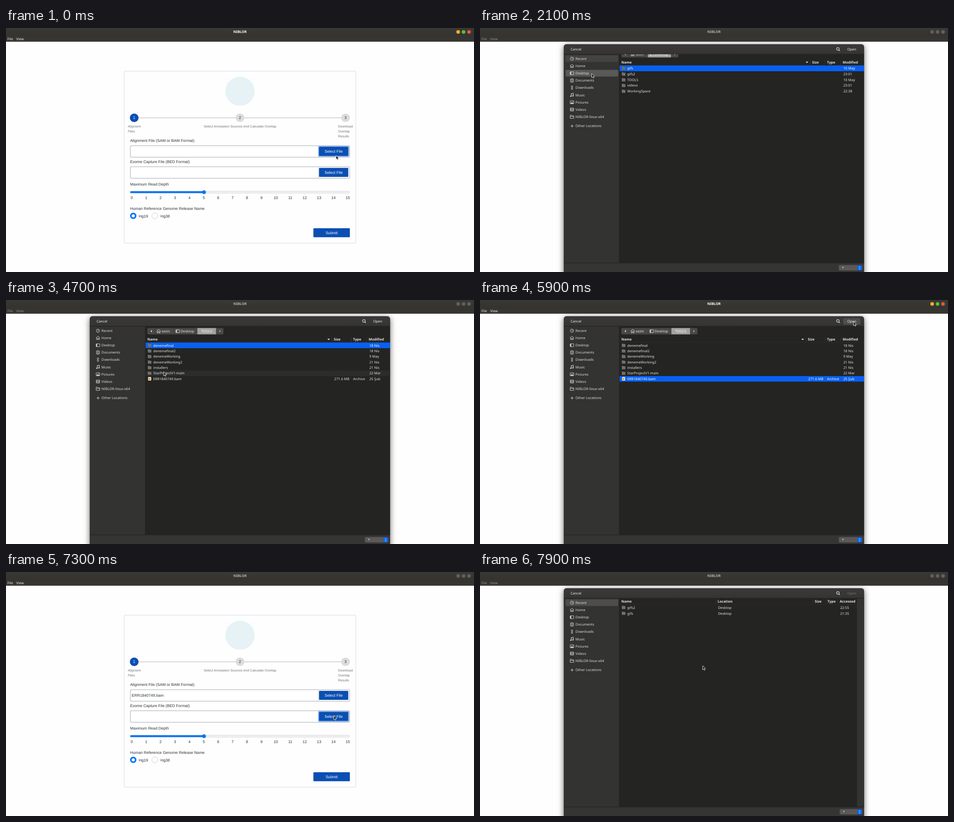
Animation of 1033x542 px, one loop 8 s. Source, as an HTML page with a canvas:

```html
<!DOCTYPE html>
<html lang="en">
<head>
<meta charset="utf-8">
<title>NIBLOR</title>
<style>
html, body { margin: 0; width: 100%; height: 100%; overflow: hidden; background: #fefefe; }
canvas { display: block; width: 1033px; height: 542px; }
</style>
</head>
<body>
<canvas id="stage" width="1033" height="542"></canvas>
<script>
const g = document.getElementById('stage').getContext('2d');
const LOOP = 8000, STEP = 100;
const UI = '"Noto Sans", "Open Sans", sans-serif';
const WEB = '"Liberation Sans", Arial, sans-serif';
const BLUE = '#0b4fb3', ACCENT = '#0a74f5', SELECT = '#0860f2', INK = '#e4e4e2';
const APP = 'NIBLOR', USER = 'sezin';

// Pointer path: time, x, y
const PATH = [
  [0, 728, 283], [100, 735, 281], [200, 738, 277], [300, 731, 276], [600, 731, 276],
  [1300, 330, 150], [1800, 246, 101], [2200, 246, 101], [2500, 348, 134], [3000, 348, 134],
  [3100, 352, 139], [3200, 352, 139], [3400, 349, 146], [3600, 347, 148], [3700, 345, 147],
  [3800, 345, 147], [4100, 340, 124], [4400, 340, 124], [4800, 350, 171], [5100, 350, 171],
  [5600, 824, 48], [6000, 824, 48], [6500, 724, 331], [6900, 723, 319], [7450, 723, 319],
  [7900, 491, 208]
];

const PLACES = ['Recent', 'Home', 'Desktop', 'Documents', 'Downloads', 'Music', 'Pictures',
  'Videos', APP + '-linux-x64'];
const DESKTOP = [['gifs', '10 May'], ['gifs2', '23:01'], ['TOOLS', '10 May'],
  ['videos', '23:01'], ['WorkingSpace', '22:38']];
const TOOLS = [['denemefinal', '18 Nis'], ['denemefinal2', '18 Nis'], ['denemeWorking', '9 May'],
  ['denemeWorking2', '21 Nis'], ['installers', '21 Nis'], ['StarProjectV1-main', '22 Mar'],
  ['ERR1840749.bam', '25 Şub', '271.6 MB']];

const clamp = v => Math.max(0, Math.min(1, v));

function text(s, x, y, color, size, font, align = 'left', weight = '') {
  g.font = `${weight} ${size}px ${font}`;
  g.textAlign = align;
  g.fillStyle = color;
  g.fillText(s, x, y + size * 0.36);
}
const ui = (s, x, y, color = INK, align, weight) => text(s, x, y, color, 7.65, UI, align, weight);
const bold = (s, x, y, color = INK, align) => ui(s, x, y, color, align, 'bold');
const web = (s, x, y, color = '#2b3035', align) => text(s, x, y, color, 8.6, WEB, align);

function box(x, y, w, h, fill, r = 0, stroke, lw = 1) {
  g.beginPath();
  g.roundRect(x, y, w, h, r);
  if (fill) { g.fillStyle = fill; g.fill(); }
  if (stroke) { g.strokeStyle = stroke; g.lineWidth = lw; g.stroke(); }
}

function disc(x, y, r, fill, stroke, lw = 1) {
  g.beginPath();
  g.arc(x, y, r, 0, 7);
  if (fill) { g.fillStyle = fill; g.fill(); }
  if (stroke) { g.strokeStyle = stroke; g.lineWidth = lw; g.stroke(); }
}

function line(color, lw, ...p) {
  g.beginPath();
  for (let i = 0; i < p.length; i += 2) g.lineTo(p[i], p[i + 1]);
  g.strokeStyle = color;
  g.lineWidth = lw;
  g.stroke();
}

function poly(fill, ...p) {
  g.beginPath();
  for (let i = 0; i < p.length; i += 2) g.lineTo(p[i], p[i + 1]);
  g.closePath();
  g.fillStyle = fill;
  g.fill();
}

function pointerAt(t) {
  let i = 0;
  while (i < PATH.length - 1 && PATH[i + 1][0] <= t) i++;
  const a = PATH[i], b = PATH[i + 1] || a;
  const k = b === a ? 0 : (t - a[0]) / (b[0] - a[0]);
  return { x: a[1] + (b[1] - a[1]) * k, y: a[2] + (b[2] - a[2]) * k };
}

function drawPointer({ x, y }) {
  g.save();
  g.translate(x, y);
  g.beginPath();
  [[0.5, 0], [0.5, 9], [2.6, 7.3], [4, 10.3], [5.6, 9.6], [4.2, 6.7], [7, 6.5]]
    .forEach(p => g.lineTo(...p));
  g.closePath();
  g.fillStyle = '#1d1d1d';
  g.fill();
  g.strokeStyle = '#e8e8e8';
  g.lineWidth = 0.9;
  g.stroke();
  g.restore();
}

function drawBar(active, menuOn) {
  const grad = g.createLinearGradient(0, 0, 0, 30);
  grad.addColorStop(0, '#3a3936');
  grad.addColorStop(0.5, '#353431');
  grad.addColorStop(1, '#373633');
  g.fillStyle = grad;
  g.fillRect(0, 0, 1033, 30.5);
  bold(APP, 516.5, 8.5, active ? '#fff' : '#b4b3b0', 'center');
  ['#f5b120', '#57c038', '#e2573c'].forEach((c, i) =>
    disc(998 + 12 * i, 8.7, 4, active ? c : '#605f5d'));
  ui('File', 3, 24, menuOn ? '#f0f0ee' : '#8f8e8b');
  ui('View', 22.5, 24, menuOn ? '#f0f0ee' : '#8f8e8b');
}

function button(s, x, y, w, focus) {
  if (focus) box(x - 1, y - 1, w + 2, 22, null, 2, '#83aee8', 2);
  box(x, y, w, 20, BLUE, 1.5);
  web(s, x + w / 2, y + 9.8, '#fff', 'center');
}

function field(label, y, value, focus) {
  web(label, 274, y - 24);
  box(274.5, y - 12.5, 484, 25.5, '#fff', 2, '#bfc2c5', 1.5);
  line('#c3c6c9', 1, 690, y - 12, 690, y + 13);
  web(value, 277.5, y);
  button('Select File', 691, y - 10, 64.5, focus);
}

function drawForm(fileName, focus) {
  box(261, 95.8, 511, 382, '#fefefe', 3, '#e2e4e7', 1.4);
  disc(516.5, 140.5, 32.3, '#e6f2f5');

  line('#d6d6d6', 2, 283, 199.5, 749.5, 199.5);
  [283, 516.5, 749.5].forEach((x, i) => {
    disc(x, 199.5, 9.6, i ? '#dcdcdc' : BLUE);
    web(String(i + 1), x, 199.3, i ? '#333' : '#fff', 'center');
  });
  const hint = (s, x, y, align) => text(s, x, y, '#707478', 7.3, WEB, align);
  ['Aligment', 'Files'].forEach((s, i) => hint(s, 269, 218.8 + 10.8 * i));
  hint('Select Annotation Sources And Calculate Overlap', 516.5, 218.8, 'center');
  ['Download', 'Overlap', 'Results'].forEach((s, i) => hint(s, 733, 218.8 + 10.8 * i));

  field('Alignment File (SAM or BAM Format)', 274, fileName, focus === 1);
  field('Exome Capture File (BED Format)', 320.8, '', focus === 2);

  web('Maximum Read Depth', 274, 347.3);
  box(274.5, 362.7, 484, 4, '#f4f4f4', 2, '#d2d4d6', 1);
  box(274, 362.4, 163, 4.4, ACCENT, 2);
  disc(437, 364.7, 4.3, ACCENT);
  for (let i = 0; i <= 15; i++) {
    const x = 277.6 + 31.8 * i;
    if (i) line('#d4d4d4', 0.8, x, 368.5, x, 370.5);
    web(String(i), x, 377.2, '#2b3035', 'center');
  }

  web('Human Reference Genome Release Name', 274, 401.3);
  disc(280.9, 417.3, 5.2, '#fff', ACCENT, 3.6);
  web('Hg19', 293, 417.5);
  disc(328.7, 417.3, 6.7, '#fff', '#c9ccd0', 1);
  web('Hg38', 341, 417.5);
  button('Submit', 678.5, 444.8, 80.5);
}

function placeIcon(i, y) {
  const c = '#d2d2d0', x = 203;
  const frame = (w, h) => box(x - w / 2, y - h / 2, w, h, null, 0.8, c, 1);
  if (i === 0) {
    disc(x, y, 3.7, null, c);
    line(c, 0.9, x, y - 2.3, x, y, x + 2, y + 0.8);
  } else if (i === 1) {
    line(c, 1, x - 4.5, y, x, y - 4, x + 4.5, y);
    line(c, 1, x - 3, y - 1, x - 3, y + 3.7, x - 1, y + 3.7, x - 1, y + 1, x + 1, y + 1,
      x + 1, y + 3.7, x + 3, y + 3.7, x + 3, y - 1);
  } else if (i === 2) {
    frame(8, 6.5);
    box(x - 4, y - 3, 2.3, 6, c);
  } else if (i === 3) {
    frame(6.6, 7.6);
    for (let k = -2; k < 3; k += 2) line(c, 0.8, x - 2, y + k, x + 2, y + k);
  } else if (i === 4) {
    disc(x, y - 2.3, 1.8, null, c);
    line(c, 1, x, y - 1, x, y + 4);
    line(c, 1, x - 2.5, y + 1.5, x, y + 4, x + 2.5, y + 1.5);
  } else if (i === 5) {
    line(c, 1.2, x - 1.5, y + 2.7, x - 1.5, y - 3, x + 3, y - 3.7, x + 3, y + 1.8);
    disc(x - 2.5, y + 2.7, 1.5, c);
    disc(x + 2, y + 1.9, 1.5, c);
  } else if (i === 6) {
    frame(8, 6.6);
    poly(c, x - 3.5, y + 3, x - 1, y - 0.5, x + 1, y + 1.3, x + 2, y, x + 3.5, y + 3);
    disc(x + 1.8, y - 1.5, 0.8, c);
  } else if (i === 7) {
    frame(7.6, 6.6);
    line(c, 0.9, x - 2, y - 3, x - 2, y + 3);
    line(c, 0.9, x + 2, y - 3, x + 2, y + 3);
    line(c, 0.9, x - 3.5, y, x + 3.5, y);
  } else {
    line(c, 1, x - 4, y + 3.5, x - 4, y - 3.5, x - 1, y - 3.5, x, y - 2, x + 4, y - 2,
      x + 4, y + 3.5, x - 4, y + 3.5);
    line(c, 0.8, x - 4, y - 0.5, x + 4, y - 0.5);
  }
}

function drawSidebar(marks, pointer) {
  PLACES.forEach((s, i) => {
    const y = 68.2 + 16.13 * i;
    const hover = pointer.x > 189 && pointer.x < 305 && Math.abs(pointer.y - y) < 8;
    const a = (marks[i] || 0) * 0.13 + (hover ? 0.06 : 0);
    if (a) box(189, y - 7.4, 116, 14.8, `rgba(255,255,255,${a})`, 2);
    placeIcon(i, y);
    ui(s, 210.8, y, '#dededc');
  });
  line('#d2d2d0', 1, 200, 217.8, 206.5, 217.8);
  line('#d2d2d0', 1, 203.2, 214.5, 203.2, 221);
  ui('Other Locations', 210.8, 217.7, '#dededc');
}

function fileIcon(y, archive) {
  if (archive) {
    box(313.5, y - 4, 7, 8, '#e9dccb', 1);
    box(314.5, y - 1.5, 4, 4, '#e8963c', 1);
  } else {
    box(313, y - 3.8, 4, 3, '#8a6a5c', 0.7);
    box(313, y - 3, 8, 6.6, '#6f6d6a', 0.8);
    line('#85827e', 0.8, 314, y - 0.8, 320, y - 0.8);
  }
}

function columns(y, right, list) {
  list.forEach(([s, x], i) => {
    if (i) line('#3a3a38', 0.8, x - 4, y - 5, x - 4, y + 5);
    bold(s, x, y);
  });
  line('#2e2e2c', 0.8, 308, y + 6.5, right, y + 6.5);
}

function drawRecent(withArchive) {
  const sx = withArchive ? 727.5 : 739, tx = withArchive ? 758.5 : 767;
  columns(65.5, 832, [['Name', 312], ['Location', 524.5], ['Size', sx], ['Type', tx],
    ['Accessed', 794]]);
  const rows = [['gifs2', 'Desktop', '22:55'], ['gifs', 'Desktop', '21:35']];
  if (withArchive) rows.splice(1, 0, ['ERR1840777.bam', 'Downloads', '22:24']);
  rows.forEach(([name, place, time], i) => {
    const y = 78.8 + 12.95 * i, archive = place === 'Downloads';
    fileIcon(y, archive);
    ui(name, 325, y);
    ui(place, 525.5, y);
    ui(time, 795, y);
    if (archive) {
      ui('1.8 GB', 751, y, INK, 'right');
      ui('Archive', 759.5, y);
    }
  });
  box(832, 59, 15.5, 462, '#333331');
}

function drawPathBar(y, inTools) {
  const end = inTools ? 480 : 438;
  box(312, y - 7, end - 312, 14, '#4a4947', 2.5, '#3a3937', 0.8);
  if (inTools) box(422, y - 7, 42, 14, '#a3a2a0');
  else box(370, y - 7, 52, 14, '#a3a2a0');
  [329, 370, 422].concat(inTools ? 464 : []).forEach(x => line('#3b3a38', 0.8, x, y - 7, x, y + 7));
  poly('#e0e0de', 322, y - 2.5, 322, y + 2.5, 319, y);
  const ax = end - 9;
  poly('#b0b0ae', ax, y - 2.5, ax, y + 2.5, ax + 3, y);
  g.save();
  g.translate(134, 0);
  placeIcon(1, y);
  g.translate(42, 0);
  placeIcon(2, y);
  g.restore();
  ui(USER, 343.5, y);
  ui('Desktop', 385.5, y, inTools ? INK : '#fff');
  if (inTools) ui('TOOLS', 443, y, '#fff', 'center');
}

function drawFolder(reveal, inTools, picked, pointer) {
  const shift = -22.5 * (1 - reveal), rows = inTools ? TOOLS : DESKTOP;
  const pitch = inTools ? 12.38 : 12.7, head = 87.5 + shift;
  g.save();
  g.beginPath();
  g.rect(308, 58.5, 540, 463);
  g.clip();
  drawPathBar(69.3 + shift, inTools);
  const sx = inTools ? 723.5 : 733;
  columns(head, 847.5, [['Name', 312], ['Size', sx], ['Type', 766], ['Modified', 800.5]]);
  const ax = sx - 11.3;
  poly(INK, ax - 2.8, head - 1.5, ax + 2.8, head - 1.5, ax, head + 1.7);
  rows.forEach(([name, date, size], i) => {
    const y = 100.8 + shift + pitch * i;
    const hover = pointer.x > 308 && Math.abs(pointer.y - y) < pitch / 2;
    if (i === picked) box(308, y - pitch / 2, 540, pitch, SELECT);
    else if (hover) box(308, y - pitch / 2, 540, pitch, '#2c2c2b');
    fileIcon(y, !!size);
    const c = i === picked ? '#fff' : INK;
    ui(name, 325, y, c);
    ui(date, 802, y, c);
    if (size) {
      ui(size, 758, y, c, 'right');
      ui('Archive', 766, y, c);
    }
  });
  g.restore();
}

function drawDialog(t, scale, pointer) {
  const recent = t < 2000 || t > 7000, inTools = t >= 4300 && !recent;
  g.save();
  g.translate(0, 293);
  g.scale(1, scale);
  g.translate(0, -293);
  g.globalAlpha = scale;

  g.save();
  g.shadowColor = 'rgba(0,0,0,0.6)';
  g.shadowBlur = 13;
  g.shadowOffsetY = 3;
  box(184.8, 36, 663, 514, '#353533', 6);
  g.restore();
  const grad = g.createLinearGradient(0, 36, 0, 58);
  grad.addColorStop(0, '#3b3a38');
  grad.addColorStop(1, '#353432');
  box(185, 36.5, 662.5, 22, grad, [6, 6, 0, 0]);
  box(185, 58.5, 122.5, 463, '#333331');
  box(308, 58.5, 539.5, 463, '#242422');
  line('#1f1f1d', 1, 185, 58.3, 847.5, 58.3);
  line('#1f1f1d', 1, 307.5, 58, 307.5, 521.5);
  line('#1f1f1d', 1, 185, 521.8, 847.5, 521.8);

  ui('Cancel', 200, 47.3, '#f4f4f2', 'left', 500);
  disc(790, 46.5, 2.9, null, '#dededc', 1.1);
  line('#dededc', 1.3, 792, 48.7, 794.3, 51);
  if (!recent && pointer.x > 802 && pointer.y < 55)
    box(802, 41, 37, 13, '#4f4e4c', 2.5, '#5c5b59', 0.6);
  ui('Open', 820.5, 47.3, recent ? '#73726f' : '#f4f4f2', 'center', 500);

  const fade = clamp((2250 - t) / 250);
  drawSidebar(recent ? { 0: 1 } : inTools ? {} : { 0: fade, 2: 1 }, pointer);

  if (recent) {
    drawRecent(t < 2000);
  } else {
    const reveal = 1 - Math.pow(1 - clamp((t - 2000) / 480), 3);
    const picked = inTools ? (t >= 5000 ? 6 : 0) : (t >= 4200 ? 2 : 0);
    drawFolder(reveal, inTools, picked, pointer);
  }

  const cx = t > 7000 ? 794 : 792;
  box(cx, 526.6, 844 - cx, 12.2, '#5a5957', 2.5, '#474644', 0.7);
  ui('*', cx + 7, 533, '#f0f0ee');
  box(833, 527.2, 10, 11, SELECT, 2);
  line('#fff', 1, 836.2, 531.7, 838, 529.9, 839.8, 531.7);
  line('#fff', 1, 836.2, 534, 838, 535.8, 839.8, 534);
  g.restore();
}

// Share of the dialog's full height at time t
function dialogScale(t) {
  const open = start => 1 - Math.pow(1 - clamp((t - start) / 100), 2);
  if (t > 7000) return open(7330);
  if (t > 5900) return 1 - clamp((t - 5900) / 100);
  return open(417);
}

function draw(t) {
  const pointer = pointerAt(t), scale = dialogScale(t);
  g.fillStyle = '#fefefe';
  g.fillRect(0, 0, 1033, 542);
  const active = t < 500 || (t >= 5900 && t < 7300);
  drawBar(active, active || (t >= 7300 && scale === 0));
  drawForm(t >= 6100 ? 'ERR1840749.bam' : '', t >= 7200 ? 2 : t < 6600 ? 1 : 0);
  if (scale > 0) drawDialog(t, scale, pointer);
  drawPointer(pointer);
}

g.textRendering = 'geometricPrecision';
const begin = performance.now();
function tick() {
  const t = (performance.now() - begin) % LOOP;
  draw(Math.floor(t / STEP) * STEP);
  requestAnimationFrame(tick);
}
tick();
</script>
</body>
</html>
```
